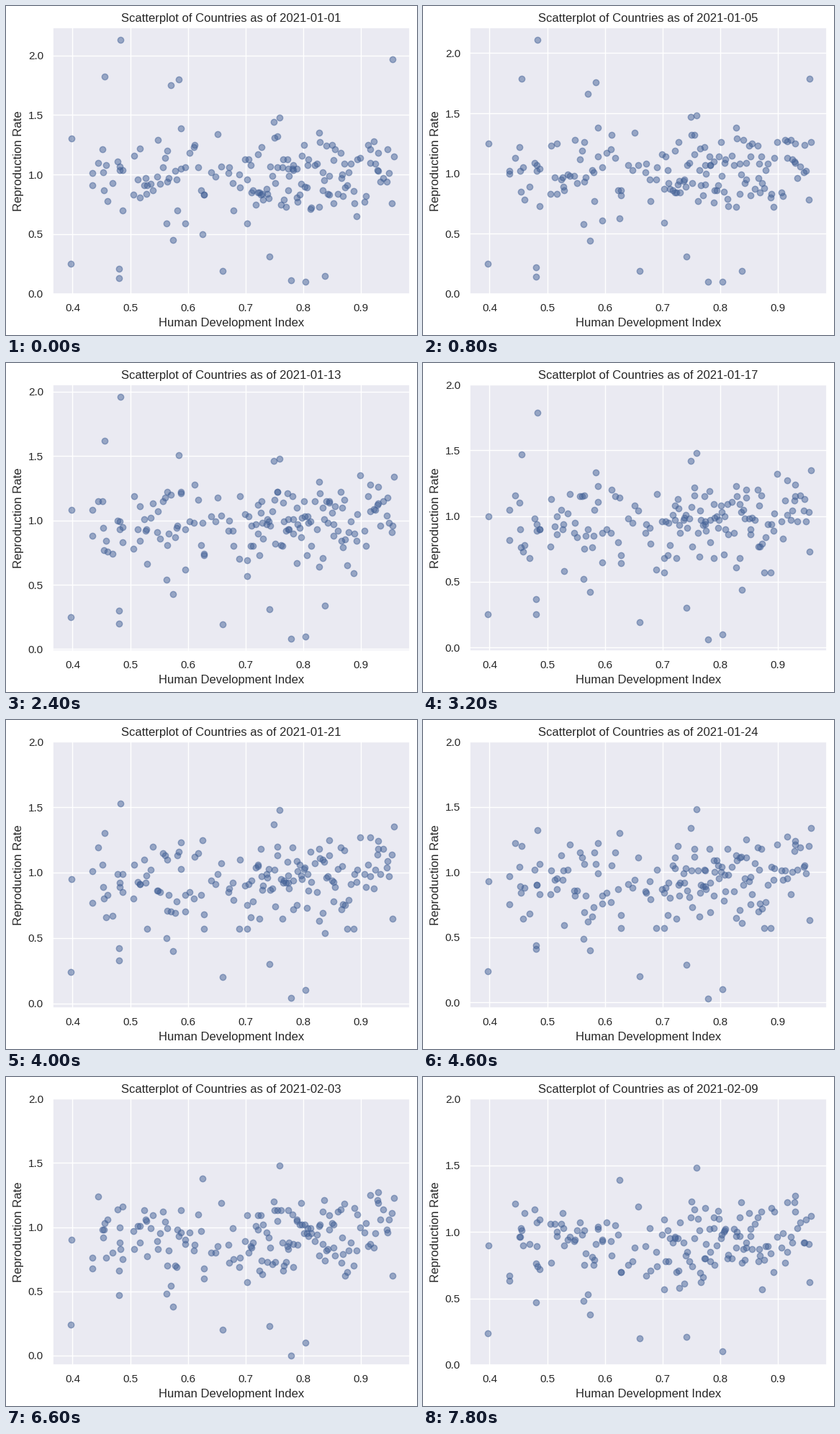
A matplotlib script that plays this animation: 571x457 px, repeating every 8000 ms.

```python
import matplotlib.pyplot as plt
import numpy as np
from matplotlib.animation import FuncAnimation
from matplotlib.ticker import MultipleLocator

W, H, DPI = 571, 457, 100
DAYS, STEP_MS = 40, 200
CROWD = 155
INK = "#262626"

# Countries that stand apart: index, first rate, last rate, middle day, pace
OUTLIERS = [
    (.483, 2.15, .70, 21.5, 5), (.584, 1.85, .90, 15, 5),
    (.571, 1.80, .53, 12.5, 4), (.955, 2.05, .62, 8.5, 3),
    (.456, 1.85, 1.0, 17, 5), (.759, 1.48, 1.48, 20, 5),
    (.779, .13, -.01, 16, 8), (.804, .10, .10, 20, 5),
    (.838, .08, .80, 16, 7), (.481, .11, .86, 26, 7),
    (.481, .20, .47, 14, 4), (.397, .25, .24, 20, 5),
    (.661, .19, .20, 20, 5), (.574, .45, .38, 16, 6),
    (.563, .60, .48, 12, 5), (.741, .31, .19, 30, 5),
    (.625, .30, 1.40, 9, 6), (.398, 1.35, .90, 10, 5),
]


def ease(start, end, middle, pace, days):
    """S-shaped change from start to end."""
    return start + (end - start) / (1 + np.exp((middle - days) / pace))


def crowd_index(rng):
    share = np.linspace(0, 1, CROWD) + rng.normal(0, .006, CROWD)
    return np.interp(share, [0, .11, .265, .37, .645, .83, 1],
                     [.433, .512, .605, .700, .800, .872, .957])


def crowd_rates(rng, days):
    level = rng.normal(0, .13, CROWD)
    swing = rng.uniform(.08, .26, CROWD)
    phase = rng.uniform(0, 2 * np.pi, CROWD)
    speed = rng.uniform(.04, .14, CROWD)
    mean = .96 + .07 * np.exp(-((days - 6) / 7) ** 2)
    wave = swing * np.sin(phase + speed * days)
    return np.clip(mean + level + wave, .57, 1.47)


def build():
    rng = np.random.default_rng(21)
    days = np.arange(DAYS)[:, None]
    x, start, end, middle, pace = np.transpose(OUTLIERS)
    index = np.r_[x, crowd_index(rng)]
    rates = np.hstack([ease(start, end, middle, pace, days),
                       crowd_rates(rng, days)])
    rates[rates < 0] = np.nan
    return index, np.round(rates, 2)


def date(day):
    month, d = (1, day + 1) if day < 31 else (2, day - 30)
    return f"2021-{month:02d}-{d:02d}"


plt.rcParams.update({
    "font.family": "Liberation Sans", "text.color": INK,
    "axes.facecolor": "#EAEAF2", "axes.edgecolor": "white",
    "axes.linewidth": 1.25, "axes.labelcolor": INK,
    "axes.labelsize": 12, "axes.titlesize": 12,
    "axes.grid": True, "axes.axisbelow": True,
    "grid.color": "white", "grid.linewidth": 1,
    "xtick.labelsize": 11, "ytick.labelsize": 11,
    "xtick.color": INK, "ytick.color": INK,
    "xtick.major.size": 6, "ytick.major.size": 6,
    "xtick.bottom": False, "ytick.left": False,
})

index, rates = build()

fig = plt.figure(figsize=(W / DPI, H / DPI), dpi=DPI, facecolor="white")
ax = fig.add_axes([65.1 / W, 57.1 / H, 496 / W, 369.6 / H])
ax.set_xlim(.36585, .98515)
for axis, step in ((ax.xaxis, .1), (ax.yaxis, .5)):
    axis.set_major_locator(MultipleLocator(step))
    axis.set_major_formatter("{x:.1f}")
ax.set_xlabel("Human Development Index")
ax.set_ylabel("Reproduction Rate")
title = ax.set_title("")
dots = ax.scatter(index, rates[0], s=36, c="#446297", alpha=.5, linewidths=1)


def update(day):
    y = rates[day]
    low, high = np.nanmin(y), np.nanmax(y)
    pad = .05 * (high - low)
    ax.set_ylim(min(0, low - pad), max(2, high + pad))
    dots.set_offsets(np.column_stack([index, y]))
    title.set_text(f"Scatterplot of Countries as of {date(day)}")
    return dots, title


anim = FuncAnimation(fig, update, frames=DAYS, init_func=lambda: update(0),
                     interval=STEP_MS, repeat=True, repeat_delay=0, blit=False)
plt.show()
```
